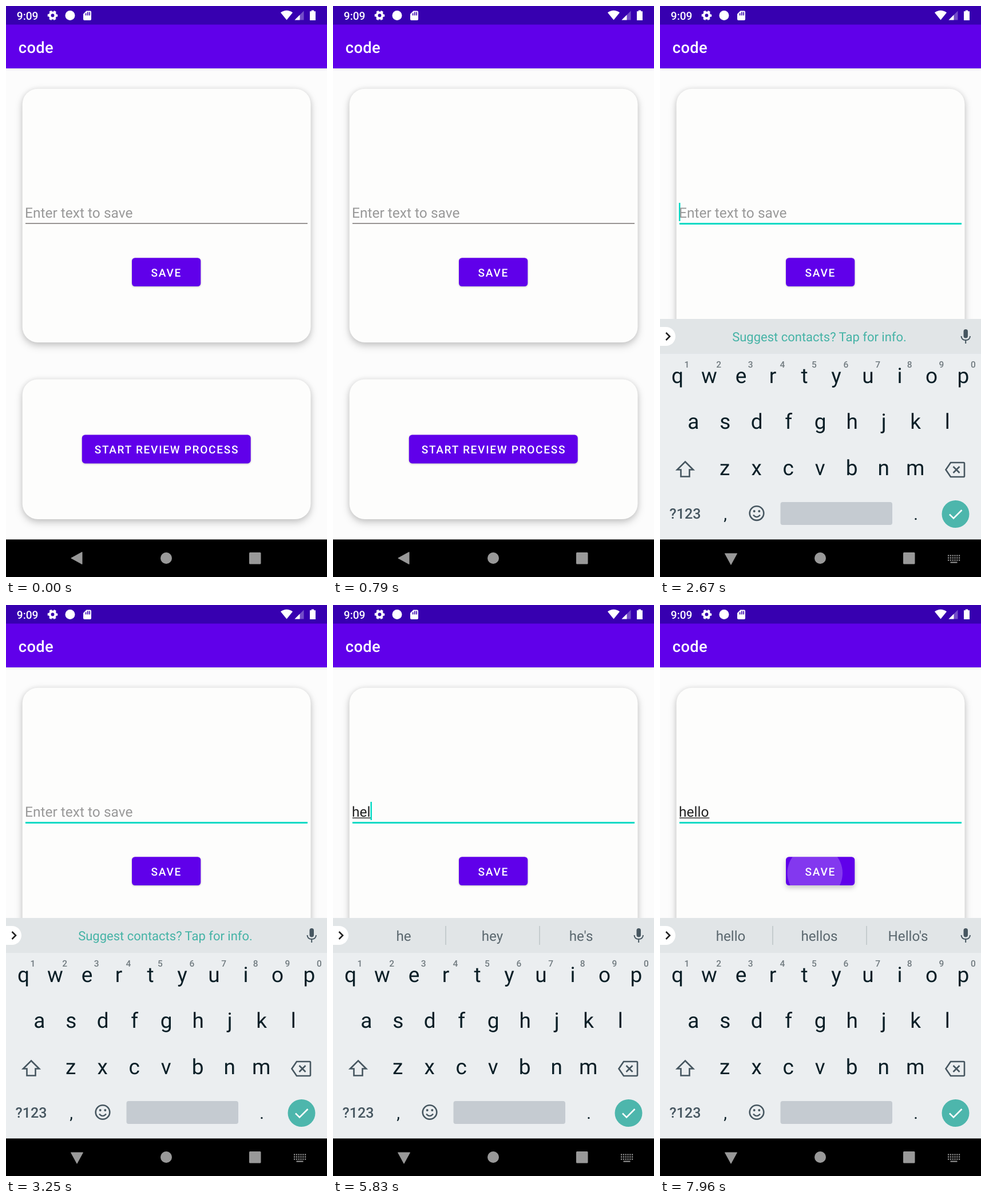
An HTML page for the animation above (8000 ms loop, 561x998 px).

```html
<!DOCTYPE html>
<html lang="en">
<head>
<meta charset="utf-8">
<title>Save form</title>
<style>
  html, body { margin: 0; width: 100%; height: 100%; overflow: hidden; background: #fcfcfc; }
  svg { display: block; width: 561px; height: 998px; font-family: Roboto, "Noto Sans", sans-serif; }
  text { white-space: pre; text-rendering: geometricPrecision; }
  .card { fill: #fdfdfc; filter: drop-shadow(0 6px 7px rgba(0,0,0,.18)) drop-shadow(0 0 5px rgba(0,0,0,.1)); }
  .button { fill: #6000ea; filter: drop-shadow(0 1.5px 1.5px rgba(0,0,0,.22)); }
  .line { fill: none; stroke: #465660; stroke-width: 2.6; }
</style>
</head>
<body>
<svg id="stage" viewBox="0 0 561 998">
  <defs>
    <clipPath id="saveClip"><rect x="220" y="440.200" width="120.300" height="49.800" rx="5.400"/></clipPath>
  </defs>

  <rect width="561" height="998" fill="#fcfcfc"/>
  <rect class="card" x="28.700" y="144.700" width="503.800" height="443.300" rx="27"/>
  <rect class="card" x="28.700" y="652.500" width="503.800" height="244.500" rx="27"/>

  <g id="field">
    <rect id="rule" x="34"/>
    <rect id="under" x="34" y="371.500" height="1.500" fill="#333"/>
    <rect id="caret" y="344" width="2.500" height="32" fill="#03dac5"/>
  </g>

  <rect id="save" class="button" x="220" y="440.200" width="120.300" height="49.800" rx="5.400"/>
  <g clip-path="url(#saveClip)"><circle id="ripple" fill="#fff"/></g>
  <rect class="button" x="132.800" y="749.600" width="294.900" height="49.800" rx="5.400"/>
  <g id="labels"></g>

  <rect width="561" height="109" fill="#6000ea" style="filter:drop-shadow(0 1px 2px rgba(0,0,0,.12))"/>
  <rect width="561" height="32.500" fill="#3700b0"/>
  <g id="status" fill="#fff">
    <circle cx="81.500" cy="16.500" r="4.900" fill="none" stroke="#fff" stroke-width="4"/>
    <circle cx="81.500" cy="16.500" r="7.400" fill="none" stroke="#fff" stroke-width="2.800" stroke-dasharray="4.200 3.550" stroke-dashoffset="2.100"/>
    <circle cx="112" cy="16.500" r="8.500"/>
    <path d="M140.500 8.500H147Q149 8.500 149 10.500V23Q149 25 147 25H137Q135 25 135 23V14Z"/>
    <path d="M139.700 12.500v4M143 10.500v6M146.200 10.500v6" stroke="#3700b0" stroke-width="1.700"/>
    <path d="M480 11.500Q490.500 4 501 11.500L490.500 24.500Z"/>
    <path d="M504.500 24.500L520.500 8.500V24.500Z" opacity=".3"/>
    <path d="M504.500 24.500L513.500 15.500V24.500Z"/>
    <path d="M533.800 7.500H538.200V9.300H541V25H531V9.300H533.800Z"/>
  </g>

  <g id="keyboard">
    <rect y="547" width="561" height="451" fill="#ebeef0"/>
    <rect y="547" width="561" height="61" fill="#e1e5e7"/>
    <rect x="-20" y="561" width="47" height="33" rx="16.500" fill="#fff"/>
    <path d="M10.500 571l6.500 6.500-6.500 6.500" class="line" style="stroke:#222"/>
    <rect x="530.500" y="565" width="7.500" height="15.500" rx="3.750" fill="#465660"/>
    <path d="M526.500 577Q527 584 534.200 584T542 577M534.200 584v6" class="line" style="stroke-width:2"/>
    <g id="chips"><path d="M197 561v33M361 561v33" stroke="#bcc3c6" stroke-width="1.500"/></g>
    <g id="keys"></g>
    <path d="M44 796.500L58 810.500H51.500V822.500H36.500V810.500H30Z" class="line"/>
    <path d="M508 798H530.500Q532 798 532 799.500V821.500Q532 823 530.500 823H508L499.500 810.500Z" class="line"/>
    <path d="M512.500 805l11 11m0-11l-11 11" class="line"/>
    <circle cx="169" cy="886.500" r="12.300" class="line"/>
    <path d="M163 889.500Q169 896.500 175 889.500" class="line" style="stroke-width:2.200"/>
    <g fill="#465660"><circle cx="164.700" cy="883" r="2"/><circle cx="173.300" cy="883" r="2"/></g>
    <rect x="210.500" y="867" width="195.500" height="40" rx="4" fill="#c5cbd1"/>
    <circle cx="516.500" cy="888" r="24" fill="#4db6ac"/>
    <path d="M506 888.500l7 7 14.500-14.500" class="line" style="stroke:#fff"/>
  </g>

  <rect y="932.400" width="561" height="66"/>
  <g fill="#999">
    <path id="back" d="M113.800 965L133 954.500V975.500Z" stroke="#999" stroke-width="1" stroke-linejoin="round"/>
    <circle cx="280" cy="965" r="10"/>
    <rect x="425" y="955" width="20.500" height="20.500" rx="1.500"/>
    <g id="switcher"></g>
  </g>
</svg>
<script>
const LOOP = 8000;
const FOCUS = 2380, SLIDE = 2440, PRESS = 7860;
const CHIP_DELAY = 150;

// [time, field text, suggestions]
const typing = [
  [4640, "h", ["he", "how", "hi"]],
  [5180, "he", ["he", "hey", "he's"]],
  [5720, "hel", ["hel", "hello", "help"]],
  [6300, "hell", ["hell", "he'll", "hello"]],
  [7150, "hello", ["hello", "hellos", "Hello's"]]
];

const $ = id => document.getElementById(id);
const clamp = v => Math.max(0, Math.min(1, v));
const mix = (a, b, p) => a + (b - a) * p;
const easeOut = p => 1 - (1 - p) ** 3;
const easeBoth = p => p * p * (3 - 2 * p);

function set(el, attrs) {
  for (const k in attrs) el.setAttribute(k, attrs[k]);
  return el;
}

function add(parent, tag, attrs) {
  return $(parent).appendChild(set(document.createElementNS("http://www.w3.org/2000/svg", tag), attrs));
}

function label(parent, str, x, y, size, fill, extra) {
  const el = add(parent, "text", { x, y, "font-size": size, fill, ...extra });
  el.textContent = str;
  return el;
}

const mid = { "text-anchor": "middle" };
const medium = { "font-weight": 500 };
const caps = { ...medium, "letter-spacing": 1.7 };

label("status", "9:09", 18.8, 23.5, 19.1, "#fff", medium);
label("status", "code", 21.8, 81.5, 27.3, "#fff", { ...medium, "letter-spacing": 0.34 });
label("labels", "SAVE", 253.5, 472.5, 19.1, "#fff", caps);
label("labels", "START REVIEW PROCESS", 154.8, 782, 19.1, "#fff", caps);
const entry = label("field", "", 33, 370, 24.5, "#222");

const tip = label("keyboard", "Suggest contacts? Tap for info.", 278.5, 586, 22, "#45b3a6", mid);
const chips = [123.5, 278.5, 433.5].map(x => label("chips", "", x, 586.5, 24.2, "#5a676e", mid));

const rows = [["qwertyuiop", 30.5, 659], ["asdfghjkl", 58.2, 739], ["zxcvbnm", 113.2, 820]];
for (const [letters, x, y] of rows)
  [...letters].forEach((c, i) => label("keys", c, x + i * 55.5, y, 37, "#0b1f27", mid));
[..."1234567890"].forEach((c, i) => label("keys", c, 47 + i * 55.6, 632, 15.5, "#717b80", { ...mid, ...medium }));
label("keys", "?123", 44, 896, 25, "#465660", { ...mid, ...medium });
label("keys", ",", 114, 898, 29, "#0b1f27", mid);
label("keys", ".", 447, 898, 29, "#0b1f27", mid);

for (let r = 0; r < 3; r++)
  for (let c = 0; c < 6; c++)
    add("switcher", "rect", { x: 503 + c * 3.8, y: 959.5 + r * 4, width: 2.2, height: 2.2 });
add("switcher", "rect", { x: 507.5, y: 971.5, width: 12, height: 2 });

function latest(t) {
  return typing.filter(step => step[0] <= t).pop();
}

function drawField(t) {
  const focused = t >= FOCUS;
  const step = latest(t);
  const text = step ? step[1] : "";
  entry.textContent = text || "Enter text to save";
  entry.setAttribute("fill", text ? "#222" : "#999");
  const width = text ? entry.getComputedTextLength() : 0;
  set($("under"), { width });
  set($("rule"), focused
    ? { y: 379, width: 493, height: 3, fill: "#03dac5" }
    : { y: 379.3, width: 493, height: 1.5, fill: "#797472" });
  const since = t - (step ? step[0] : FOCUS);
  set($("caret"), { x: 33 + width, opacity: focused && since % 1000 < 500 ? 1 : 0 });
}

function drawKeyboard(t) {
  const p = easeOut(clamp((t - SLIDE) / 250));
  set($("keyboard"), { opacity: p, transform: `translate(0 ${mix(80, 0, p)})` });
  set($("back"), { transform: `rotate(${-90 * p} 124.5 965.5)` });
  set($("switcher"), { opacity: p });
  const step = latest(t - CHIP_DELAY);
  set(tip, { opacity: step ? 0 : 1 });
  set($("chips"), { opacity: step ? 1 : 0 });
  if (step) chips.forEach((chip, i) => { chip.textContent = step[2][i]; });
}

function drawPress(t) {
  const p = easeBoth(clamp((t - PRESS) / 225));
  const lift = clamp((t - PRESS) / 100);
  set($("ripple"), {
    cx: mix(264, 280, p),
    cy: mix(471, 465, p),
    r: mix(36, 65, p),
    opacity: 0.22 * clamp((t - PRESS) / 75)
  });
  $("save").style.filter = `drop-shadow(0 ${mix(1.5, 4, lift)}px ${mix(1.5, 4, lift)}px rgba(0,0,0,.22))`;
}

function frame() {
  const t = performance.now() % LOOP;
  drawField(t);
  drawKeyboard(t);
  drawPress(t);
  requestAnimationFrame(frame);
}
frame();
</script>
</body>
</html>
```
